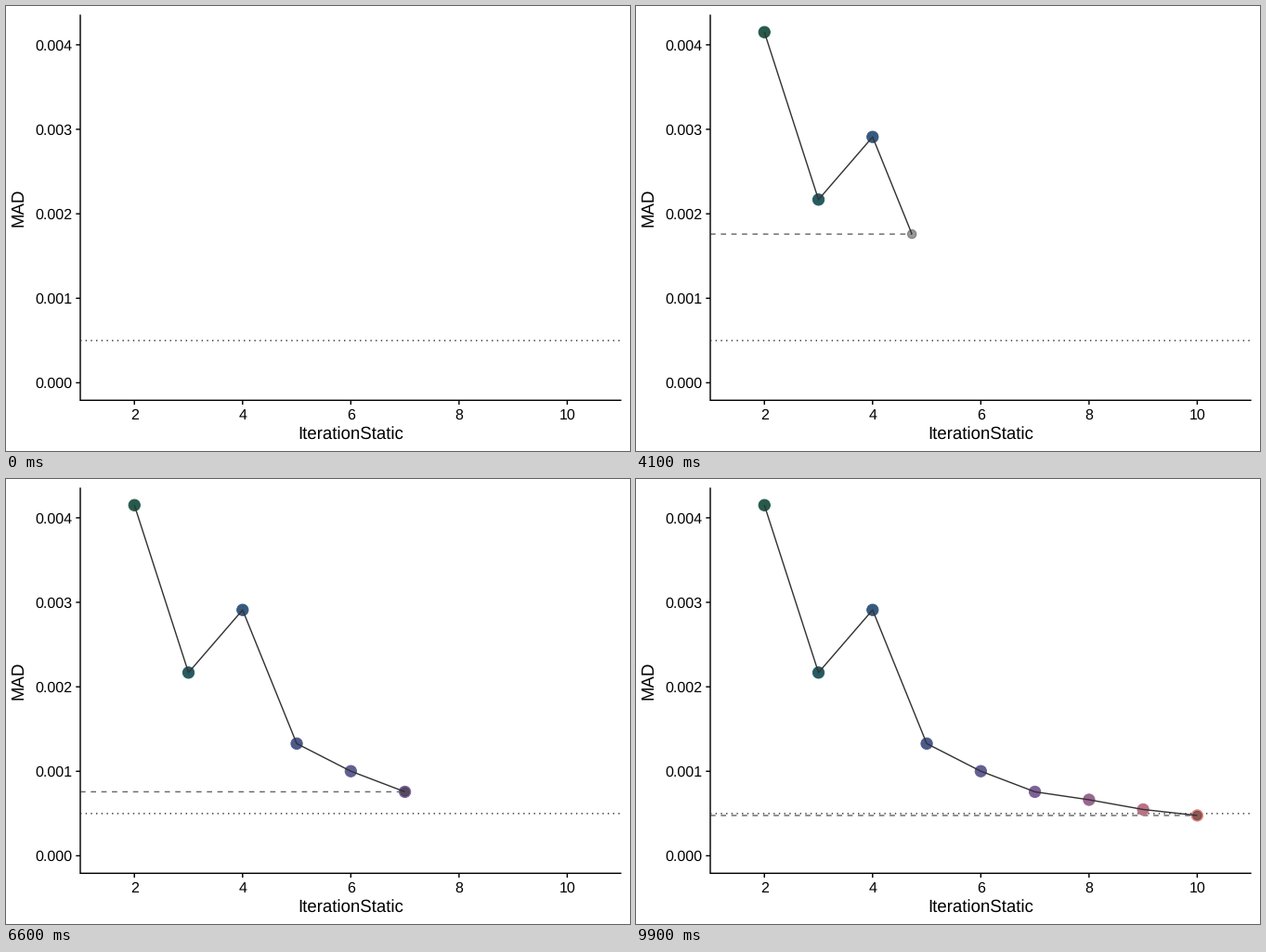
A matplotlib script for the animation above (10000 ms loop, 672 by 480 pixels).

```python
import numpy as np
import matplotlib.pyplot as plt
from matplotlib.animation import FuncAnimation
from matplotlib.patches import Circle

WIDTH, HEIGHT, DPI = 672, 480, 100
FRAMES, INTERVAL = 100, 100
STEPS_PER_ITERATION = 11

LEFT, RIGHT, TOP, BOTTOM = 80, 662.67, 9.33, 425.3
ZERO_Y, PER_THOUSANDTH = 406.4, 91.13
LINE = 1.42
INK = "#333333"

iterations = np.arange(2, 11)
mad = np.array([4.15, 2.168, 2.91, 1.328, 1.001, 0.757, 0.663, 0.548, 0.477])
colors = ["#275A4C", "#285B61", "#375A80", "#4C5B8C", "#625F95",
          "#7D6197", "#99678F", "#B97285", "#E5827A"]

plt.rcParams["font.family"] = "Liberation Sans"
plt.rcParams["text.hinting"] = "none"
plt.rcParams["toolbar"] = "None"


def px(size):
    """Pixels to points."""
    return size * 72 / DPI


def to_x(iteration):
    return LEFT + (iteration - 1) * (RIGHT - LEFT) / 10


def to_y(thousandths):
    return ZERO_Y - thousandths * PER_THOUSANDTH


fig = plt.figure(figsize=(WIDTH / DPI, HEIGHT / DPI), dpi=DPI, facecolor="white")
ax = fig.add_axes([0, 0, 1, 1])
ax.set_xlim(0, WIDTH)
ax.set_ylim(HEIGHT, 0)
ax.axis("off")


def line(xs, ys, color="black", **style):
    style.setdefault("solid_capstyle", "butt")
    return ax.plot(xs, ys, color=color, lw=px(LINE), snap=False,
                   dash_capstyle="butt", **style)[0]


def label(x, y, text, size, **style):
    style.setdefault("ha", "center")
    ax.text(x, y, text, fontsize=px(size), color="black", va="baseline", **style)


def dot(x, y, radius, color, zorder, alpha=None):
    return ax.add_patch(Circle((x, y), radius, facecolor=color, edgecolor=color,
                               lw=px(0.94), alpha=alpha, zorder=zorder))


# Axes, ticks and labels
line([LEFT, LEFT], [TOP, BOTTOM + LINE / 2])
line([LEFT, RIGHT], [BOTTOM, BOTTOM])
for tick in range(5):
    y = to_y(tick)
    line([LEFT - 4.67, LEFT], [y, y])
    label(71.3, y + 5.7, f"{tick / 1000:.3f}", 16, ha="right")
for tick in range(2, 11, 2):
    x = to_x(tick)
    line([x, x], [BOTTOM, BOTTOM + 4.67])
    label(x, 446, str(tick), 16)
label((LEFT + RIGHT) / 2, 467, "IterationStatic", 18.67)
ax.text(22.6, (TOP + BOTTOM) / 2, "MAD", fontsize=px(18.67), color="black",
        rotation=90, ha="right", va="center")

line([LEFT, RIGHT], [to_y(0.5)] * 2, INK, linestyle=(0, (1, 3)), zorder=2)

# Moving parts
level = line([], [], INK, alpha=0.75, linestyle=(0, (4, 4)), zorder=3)
dots = [dot(to_x(i), to_y(m), 6.16, c, 4) for i, m, c in zip(iterations, mad, colors)]
trace = line([], [], INK, zorder=5, solid_joinstyle="round")
head = dot(0, 0, 4.74, INK, 6, alpha=0.5)


def update(frame):
    now = 1 + frame / STEPS_PER_ITERATION
    started = frame >= STEPS_PER_ITERATION
    reached = max(0, frame // STEPS_PER_ITERATION)
    for i, point in enumerate(dots):
        point.set_visible(i < reached)
    for part in (level, trace, head):
        part.set_visible(started)
    if started:
        x, y = to_x(now), to_y(np.interp(now, iterations, mad))
        trace.set_data(np.append(to_x(iterations[:reached]), x),
                       np.append(to_y(mad[:reached]), y))
        level.set_data([LEFT, x], [y, y])
        head.center = (x, y)
    return [level, trace, head, *dots]


anim = FuncAnimation(fig, update, frames=FRAMES, interval=INTERVAL,
                     repeat=True, repeat_delay=0, blit=False)
plt.show()
```
